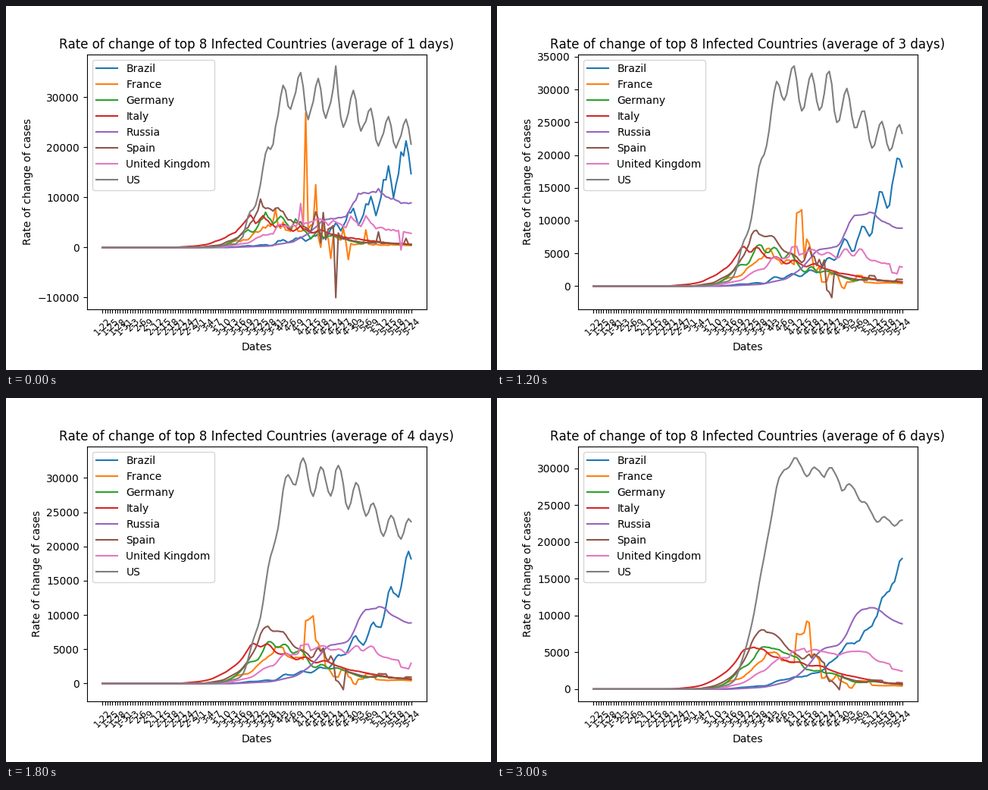
Write a matplotlib script that moves like this. It is 640 by 480 pixels and loops after 3600 ms.

```python
import numpy as np
import matplotlib.pyplot as plt
from matplotlib.animation import FuncAnimation

plt.rcParams["text.kerning_factor"] = 6

MONTHS = ((1, 31), (2, 29), (3, 31), (4, 30), (5, 31))
DATES = [f"{m}-{d}" for m, days in MONTHS for d in range(1, days + 1)]
DATES = DATES[21:145]
DAY = np.arange(len(DATES))
WINDOWS = 6

rng = np.random.default_rng(8)


def cases(trend, weekly=None, noise=0.0, events=None):
    """New cases per day.

    trend: (day, level) key points, zero before the first
    weekly: reporting factor from Monday to Sunday
    noise: relative random scatter
    events: single days with a late or corrected report
    """
    days, levels = zip(*trend)
    daily = np.interp(DAY, days, levels, left=0)
    if weekly:
        daily *= np.array(weekly)[(DAY + 2) % 7]
    daily *= 1 + noise * rng.uniform(-1, 1, len(DAY))
    for day, value in (events or {}).items():
        daily[day] = value
    return daily


COUNTRIES = {
    "Brazil": cases(
        [(50, 0), (62, 400), (68, 450), (70, 1100), (80, 1700), (84, 1900),
         (90, 2700), (95, 4700), (99, 6200), (103, 6300), (110, 9500),
         (114, 13000), (121, 17000), (123, 21000)],
        weekly=(0.85, 0.96, 1.2, 1.11, 1.25, 0.98, 0.7)),
    "France": cases(
        [(38, 0), (47, 300), (52, 1000), (58, 1750), (63, 3300), (69, 4600),
         (76, 3900), (84, 3900), (86, 2200), (92, 2100), (99, 650),
         (123, 400)],
        noise=0.2,
        events={69: 7657, 81: 26849, 85: 12500, 87: 0, 88: 4900, 91: -2200,
                96: 3800, 98: -2450, 105: 3500}),
    "Germany": cases(
        [(38, 0), (48, 300), (52, 1200), (58, 3600), (60, 2900), (65, 6900),
         (68, 4500), (71, 6700), (75, 3400), (77, 5500), (83, 1800),
         (86, 3400), (88, 1900), (92, 2400), (103, 700), (107, 1150),
         (123, 500)],
        noise=0.08),
    "Italy": cases(
        [(29, 0), (38, 300), (42, 650), (47, 1500), (54, 3400), (59, 6400),
         (61, 4900), (64, 6100), (69, 4050), (72, 4700), (76, 3200),
         (79, 4100), (83, 3000), (87, 3300), (91, 2800), (96, 2000),
         (108, 1250), (114, 850), (123, 600)],
        noise=0.06),
    "Russia": cases(
        [(52, 0), (66, 270), (70, 600), (76, 1100), (82, 2700), (88, 5500),
         (97, 6200), (102, 10500), (106, 10700), (110, 11400), (114, 10000),
         (119, 8900), (123, 8900)],
        noise=0.03),
    "Spain": cases(
        [(39, 0), (47, 500), (54, 2000), (57, 3500), (60, 5200), (63, 8800),
         (68, 7400), (71, 7700), (75, 5200), (79, 4900), (83, 3000),
         (85, 7000), (89, 3200), (92, 4600), (94, 2900), (95, 1800),
         (103, 1000), (123, 600)],
        noise=0.06,
        events={63: 9630, 87: 887, 88: 6948, 89: 1536, 93: -10034,
                110: 3086, 121: 1787}),
    "United Kingdom": cases(
        [(38, 0), (48, 80), (58, 900), (64, 2500), (68, 2700), (70, 4400),
         (75, 4300), (83, 5000), (87, 5600), (90, 4400), (92, 5200),
         (97, 4100), (99, 6200), (103, 4000), (105, 6000), (109, 3900),
         (117, 3400), (123, 2700)],
        noise=0.06,
        events={79: 8733, 119: -519}),
    "US": cases(
        [(44, 0), (53, 700), (56, 2200), (58, 5400), (62, 11000),
         (65, 16500), (69, 26000), (72, 28500), (75, 31700), (78, 31200),
         (82, 29300), (87, 29800), (93, 29200), (97, 27000), (101, 27800),
         (109, 23300), (123, 22400)],
        weekly=(0.87, 0.93, 0.985, 1.085, 1.135, 1.06, 0.92),
        events={93: 36188}),
}


def trailing_mean(daily, days):
    return np.convolve(daily, np.ones(days) / days)[:len(daily)]


fig = plt.figure(figsize=(6.4, 4.8), dpi=100, facecolor="white")
ax = fig.add_axes([0.167, 0.167, 0.7, 0.7])
tick_labels = [d if i % 3 == 0 else "" for i, d in enumerate(DATES)]


def draw(frame):
    days = frame + 1
    ax.clear()
    for name, daily in COUNTRIES.items():
        ax.plot(DAY, trailing_mean(daily, days), label=name)
    ax.set_xticks(DAY, tick_labels, rotation=45, fontsize="small")
    ax.set_title("Rate of change of top 8 Infected Countries "
                 f"(average of {days} days)")
    ax.set_xlabel("Dates")
    ax.set_ylabel("Rate of change of cases")
    ax.legend(loc="upper left")
    return ax.lines


anim = FuncAnimation(fig, draw, frames=WINDOWS, interval=600,
                     init_func=lambda: draw(0), repeat=True, repeat_delay=0)
plt.show()
```
